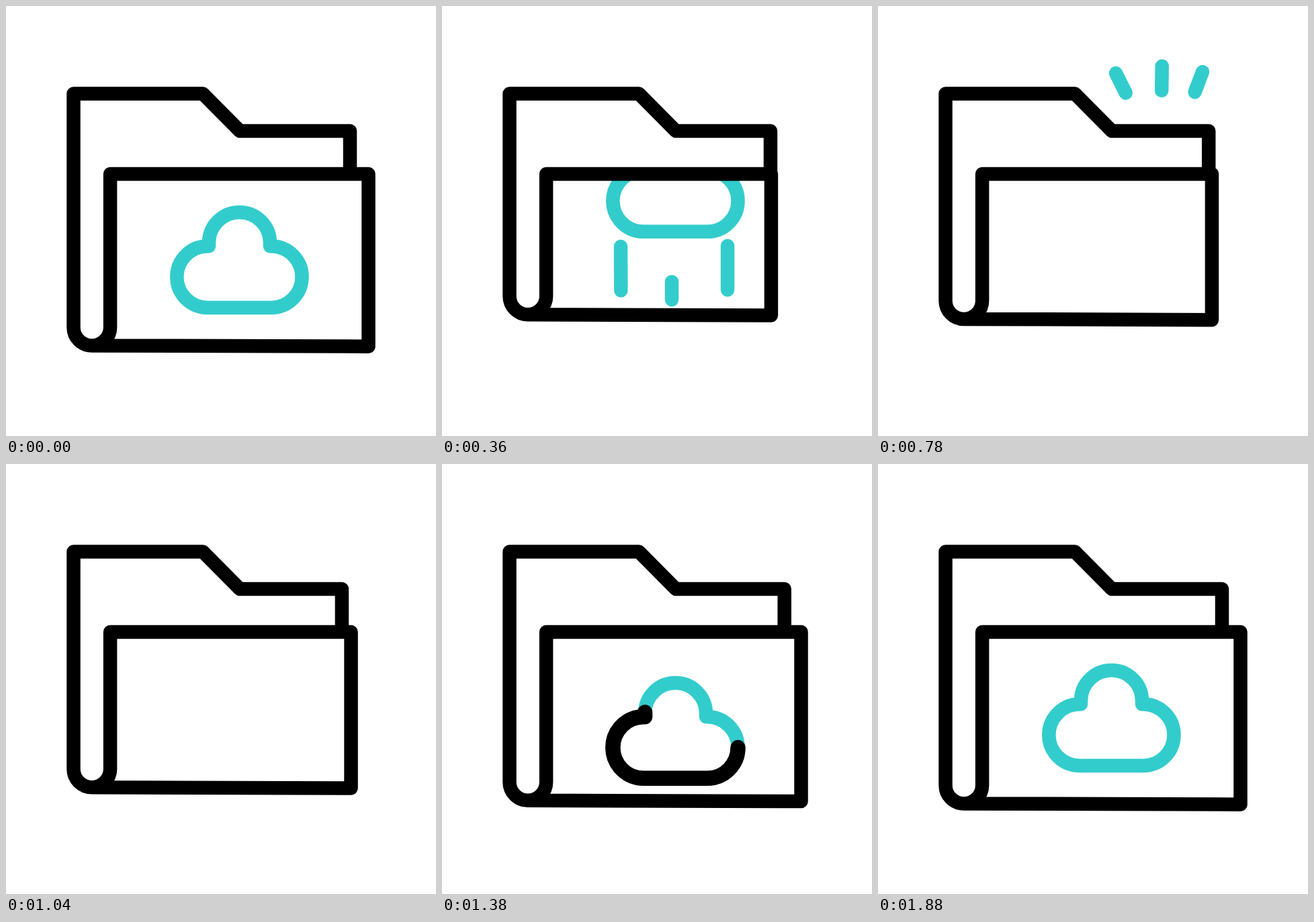
Write an HTML page that moves like this. It is 640 px wide and 640 px high and loops after 2700 ms.

```html
<!DOCTYPE html>
<html>
<head>
<meta charset="utf-8">
<style>
html, body { margin: 0; width: 100%; height: 100%; overflow: hidden; background: #fff; }
svg { display: block; width: 100%; height: 100%; }
path { fill: none; stroke: #3cc; stroke-width: 20.5; stroke-linecap: round; stroke-linejoin: round; }
#folder { stroke: #000; }
#trace { stroke: #000; stroke-width: 22.5; }
</style>
</head>
<body>
<svg viewBox="0 0 640 640">
  <clipPath id="pocket"><rect y="250" width="640" height="390"/></clipPath>
  <g id="inside" clip-path="url(#pocket)">
    <g id="cloud"><path id="outline"/><path id="trace" pathLength="1"/></g>
  </g>
  <path id="folder"/>
  <g id="rays"></g>
</svg>
<script>
const LOOP = 2700;
const $ = id => document.getElementById(id);

// Eased progress from time a to time b
const ease = (t, a, b) => {
  const u = Math.min(1, Math.max(0, (t - a) / (b - a)));
  return u * u * (3 - 2 * u);
};

// Shows only the part of a path between two fractions of its length
function trim(path, from, to) {
  path.style.visibility = to > from ? 'visible' : 'hidden';
  path.setAttribute('stroke-dasharray', `${to - from} 9`);
  path.setAttribute('stroke-dashoffset', -from);
}

function addLines(parent, shapes) {
  return shapes.map(d => {
    const path = document.createElementNS('http://www.w3.org/2000/svg', 'path');
    path.setAttribute('d', d);
    path.setAttribute('pathLength', 1);
    return parent.appendChild(path);
  });
}

const cloudShape = 'M440.5 403.3A45.7 45.7 0 0 1 395 449H300A45.7 45.7 0 0 1 300 357.5' +
  'H302V352.5A45.5 45.5 0 0 1 393 352.5V357.5H395A45.7 45.7 0 0 1 440.5 403.3';
$('outline').setAttribute('d', cloudShape);
$('trace').setAttribute('d', cloudShape);

// Each group of strokes: head start/end, tail start/end
const strokes = [
  { paths: addLines($('inside'), ['M266.3 423.5L266 358', 'M342 437V410.5', 'M425 422.5V357']),
    head: [180, 360], tail: [375, 575] },
  { paths: addLines($('rays'), ['M374 140L354 100', 'M422 139L422.7 89.5', 'M467.5 139L483 98']),
    head: [540, 700], tail: [700, 940] },
  { paths: addLines($('inside'), ['M262.5 285V354', 'M345.5 273V300.5', 'M421 285V353']),
    head: [1400, 1560], tail: [1575, 1775] }
];

function folderShape(shrink) {
  const back = 512 - shrink * .465, front = 539.5 - shrink, base = 505.5 - shrink * .93;
  return `M${back} 250V186H348L293 130.5H100.5V${base - 27.3}a27.3 27.3 0 0 0 54.6 0` +
    `V250H${front}V${base + 1.2}L128 ${base}`;
}

function draw(t) {
  const shrink = 50 * (ease(t, 20, 380) - ease(t, 520, 1590));
  $('folder').setAttribute('d', folderShape(shrink));

  const y = -214 * ease(t, 90, 612) + 246 * ease(t, 1020, 1440) - 32 * ease(t, 1440, 1880);
  $('cloud').setAttribute('transform', `translate(0 ${y})`);
  trim($('trace'), ease(t, 1400, 1640), ease(t, 1190, 1530));

  for (const { paths, head, tail } of strokes)
    for (const path of paths) trim(path, ease(t, ...tail), ease(t, ...head));
}

const start = performance.now();
function frame() {
  draw((performance.now() - start) % LOOP);
  requestAnimationFrame(frame);
}
frame();
</script>
</body>
</html>
```
